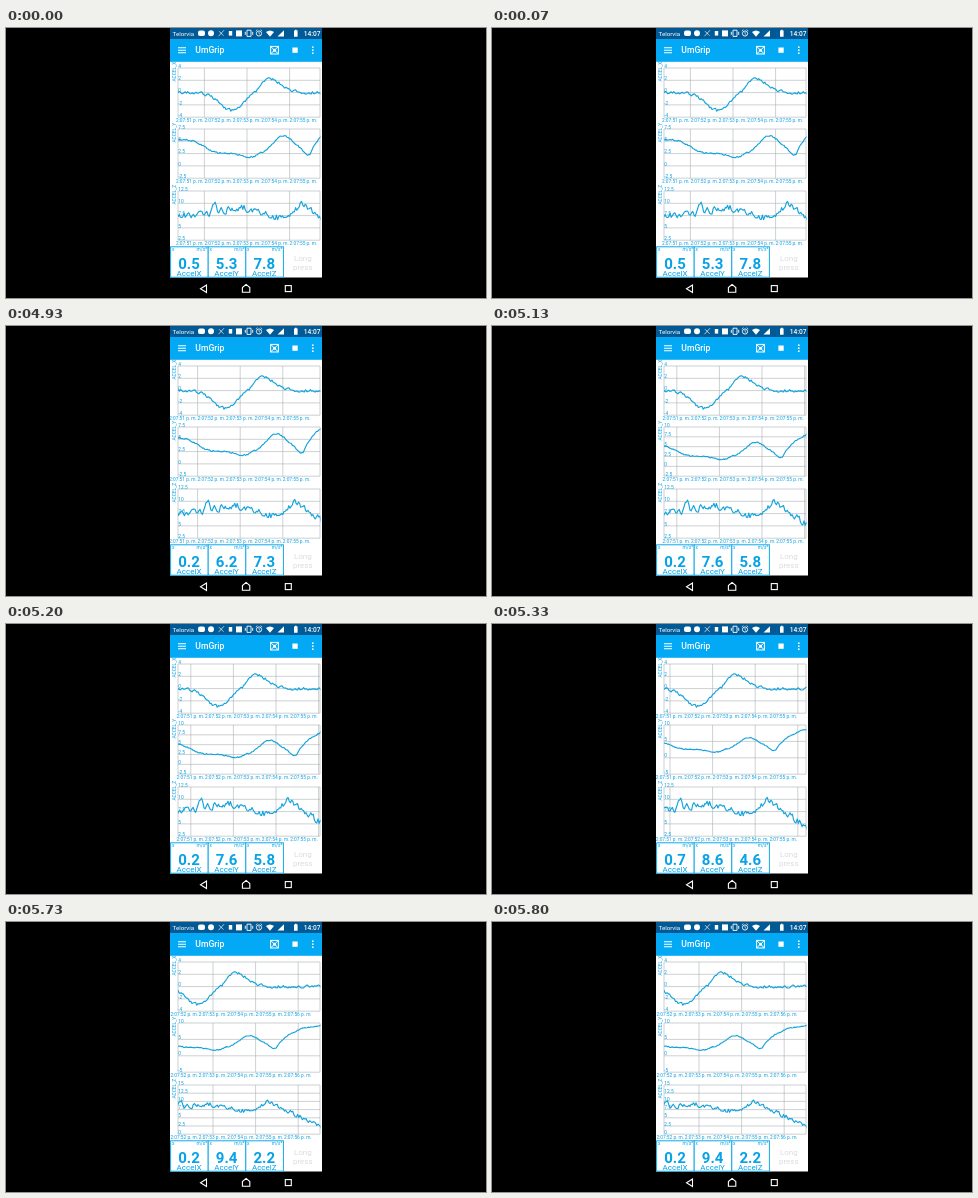
Recreate the animation shown at these times as an HTML page. Size 480 px wide and 270 px high, loop 5870 ms.

```html
<!DOCTYPE html>
<html lang="es">
<head>
<meta charset="utf-8">
<title>Sensor charts</title>
<style>
html, body { margin: 0; width: 100%; height: 100%; overflow: hidden; background: #000; }
svg { display: block; width: 480px; height: 270px; font-family: Roboto, "Open Sans", sans-serif; }
.blue { fill: #08a2e6; }
.small { font-size: 4.8px; }
.grid { stroke: #acb0b2; stroke-width: .6; fill: none; }
.curve { stroke: #14a3dc; stroke-width: 1.15; fill: none; stroke-linejoin: round; }
.tile { stroke: #14a8e8; stroke-width: 1; fill: #fff; }
.value { font-size: 15px; font-weight: 700; text-anchor: middle; }
.name { font-size: 8px; text-anchor: middle; }
.hint { font-size: 8px; text-anchor: middle; fill: #d9dcde; }
.line { fill: none; stroke: #fff; }
</style>
</head>
<body>
<svg viewBox="0 0 480 270">
  <defs>
    <clipPath id="screen"><rect x="164" y="0" width="152" height="250"/></clipPath>
    <clipPath id="plot"><rect x="172" y="34" width="142.5" height="184"/></clipPath>
  </defs>
  <rect width="480" height="270"/>
  <rect x="164" y="33" width="152" height="216.5" fill="#fff"/>
  <rect x="164" width="152" height="11.5" fill="#015a96"/>
  <rect x="164" y="11" width="152" height="22.8" fill="#03a9f4"/>

  <g fill="#fff">
    <text x="166.5" y="7.6" font-size="6.2">Telorvia</text>
    <rect x="192" y="2.4" width="7" height="5.6" rx="2"/>
    <circle cx="205" cy="5.2" r="3"/>
    <path class="line" stroke-width=".7" d="M212.5 8.2L218 2.2M213 3.2l4.5 4.5"/>
    <rect x="222.8" y="3" width="3.4" height="4.6"/>
    <rect x="230" y="2.4" width="6" height="6"/>
    <path class="line" stroke-width=".9" d="M241 2.2h4v6.2h-4zM239.3 3.8v3M246.7 3.8v3"/>
    <circle class="line" stroke-width=".9" cx="253" cy="5.5" r="2.6"/>
    <path class="line" stroke-width=".7" d="M253 4v1.6l1.2 .8M249.8 3l1.6-1.4M256.2 3l-1.6-1.4"/>
    <path d="M260 4Q264 .8 268 4L264 8.8Z"/>
    <path d="M271.5 8.6h6.5V2.2Z"/>
    <path d="M288 2.6h1V1.8h1.6v.8h1v6.2H288z"/>
    <text x="297.8" y="8" font-size="6.6" font-weight="500">14:07</text>
    <path class="line" stroke-width="1.1" d="M172 19.7h8M172 22.2h8M172 24.7h8"/>
    <text x="189.3" y="25.2" font-size="8.6" font-weight="500">UmGrip</text>
    <rect class="line" x="264.6" y="18.4" width="7.8" height="7.6"/>
    <path class="line" stroke-width="1" d="M265 18.8l7 6.8M272 18.8l-7 6.8"/>
    <circle cx="268.5" cy="22.2" r="1.5"/>
    <rect x="286.4" y="19.5" width="5.3" height="5.3"/>
    <circle cx="306.8" cy="19.2" r=".9"/><circle cx="306.8" cy="22.2" r=".9"/><circle cx="306.8" cy="25.2" r=".9"/>
  </g>

  <g id="charts" clip-path="url(#screen)"></g>
  <g id="tiles"></g>
  <text class="hint" x="296.8" y="233">Long</text>
  <text class="hint" x="296.8" y="242.4">press</text>

  <g class="line" stroke-width="1.1">
    <path d="M200.5 257v7.4l-6-3.7z"/>
    <path d="M236.4 264.2v-4.6l3.7-3.2 3.7 3.2v4.6z"/>
    <rect x="279.3" y="257.6" width="6" height="6"/>
  </g>
</svg>
<script>
const LOOP = 5870, LEFT = 172, RIGHT = 314, HEIGHT = 49.2;
const SCROLL = 6.8, SECOND = 28.4;

// Each sensor update scrolls the charts by one step
const updates = [
  { at: 0, values: [0.5, 5.3, 7.8] },
  { at: 4730, values: [0.2, 6.2, 7.3] },
  { at: 5000, values: [0.2, 7.6, 5.8] },
  { at: 5270, values: [0.7, 8.6, 4.6] },
  { at: 5470, values: [-0.1, 8.8, 3.5] },
  { at: 5670, values: [0.2, 9.4, 2.2] }
];

// Bell curve with separate left and right widths
const bump = (x, mid, left, right) => Math.exp(-(((x - mid) / (x < mid ? left : right)) ** 2));
const fall = (x, mid, width) => 1 / (1 + Math.exp((x - mid) / width));
const after = (x, from) => Math.max(0, x - from);

const charts = [
  { axis: 'X', top: 40, noise: .22,
    range: () => [4, -4, 2],
    signal: x => 2.2 * bump(x, 263, 10, 17) - 2.95 * bump(x, 227, 18, 14) },
  { axis: 'Y', top: 101, noise: .16,
    range: i => i < 2 ? [7.5, -2.5, 2.5] : i < 3 ? [10, -2.5, 2.5] : [10, -5, 5],
    signal: x => 2.5 + 2.9 * fall(x, 198, 5) - .9 * bump(x, 242, 8, 10)
      + 3.6 * bump(x, 277, 14, 17) - .6 * bump(x, 303, 8, 4)
      + 7.3 * (1 - Math.exp(-after(x, 304) / 17)) },
  { axis: 'Z', top: 163, noise: .65,
    range: i => i < 5 ? [12.5, 2.5, 2.5] : [15, 0, 2.5],
    signal: x => 8.1 - .5 * bump(x, 182, 14, 14) + 1.6 * bump(x, 208, 2, 3)
      + .9 * bump(x, 236, 22, 16) - bump(x, 272, 10, 10)
      + 1.7 * bump(x, 295, 5, 8) - .15 * after(x, 310) }
];

const chartLayer = document.getElementById('charts');
const tileLayer = document.getElementById('tiles');
const text = (x, y, cls, s, extra = '') =>
  `<text x="${x}" y="${y}" class="blue ${cls}" ${extra}>${s}</text>`;

function random(seed) {
  return () => (seed = seed * 16807 % 2147483647) / 2147483647;
}

function sample({ signal, noise, top }) {
  const next = random(top * 7919), data = [];
  let drift = 0;
  for (let x = LEFT; x < 350; x += 1.2) {
    drift = drift * .35 + (next() * 2 - 1) * noise;
    data.push([x, signal(x) + drift]);
  }
  return data;
}

for (const chart of charts) chart.data = sample(chart);

function drawChart({ top, axis, range, data }, index) {
  const bottom = top + HEIGHT, shift = index * SCROLL;
  const [max, min, step] = range(index);
  const toY = v => top + (max - v) / (max - min) * HEIGHT;
  let grid = `M${LEFT} ${top}V${bottom}M${RIGHT} ${top}V${bottom}`, labels = '';
  for (let v = max; v >= min; v -= step) {
    const y = toY(v);
    grid += `M${LEFT} ${y}H${RIGHT}`;
    labels += text(LEFT + .3, y - .4, 'small', v);
  }
  for (let x = 198.4 - shift; x < RIGHT; x += SECOND * 1.5)
    if (x > LEFT) grid += `M${x} ${top}V${bottom}`;

  // Time labels snap to half seconds
  const labelX = 170 - shift + Math.floor(index / 2) * SECOND / 2;
  const second = 51 + Math.floor(index / 4);
  for (let i = 0; i < 5; i++)
    labels += text(labelX + i * SECOND, bottom + 4.9, 'small', `2:07:${second + i} p. m.`);
  labels += text(0, 0, 'small', 'ACCEL_' + axis, `transform="translate(170 ${top + 13.5}) rotate(-90)"`);

  const line = data.map(([x, v]) => `${(x - shift).toFixed(2)},${toY(v).toFixed(2)}`).join(' ');
  return `<path class="grid" d="${grid}"/>${labels}` +
    `<polyline class="curve" clip-path="url(#plot)" points="${line}"/>`;
}

function drawTile(value, i) {
  const x = 164.6 + i * 37.6, mid = x + 18.4;
  return `<rect class="tile" x="${x}" y="218.8" width="37.6" height="30.4"/>` +
    text(x + 1.3, 223.3, 'small', 'x') +
    text(x + 36.4, 223.3, 'small', 'm/s²', 'text-anchor="end"') +
    text(mid, 240.8, 'value', value.toFixed(1)) +
    text(mid, 247.8, 'name', 'Accel' + 'XYZ'[i]);
}

let shown = -1;
const start = performance.now();

function tick() {
  const t = (performance.now() - start) % LOOP;
  const index = updates.filter(u => u.at <= t).length - 1;
  if (index !== shown) {
    shown = index;
    chartLayer.innerHTML = charts.map(c => drawChart(c, index)).join('');
    tileLayer.innerHTML = updates[index].values.map(drawTile).join('');
  }
  requestAnimationFrame(tick);
}
tick();
</script>
</body>
</html>
```
